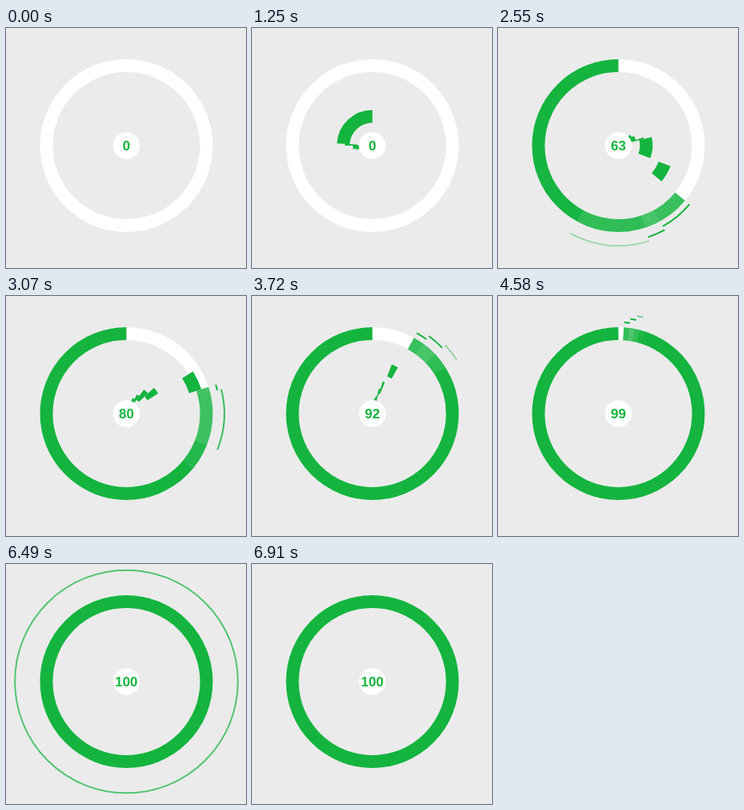
These frames come from a looping animation (300x300 px, 8000 ms). An HTML page with a canvas:

```html
<!DOCTYPE html>
<html lang="en">
<head>
<meta charset="utf-8">
<title>Chunked progress ring</title>
<style>
  html, body { margin: 0; width: 100%; height: 100%; overflow: hidden; background: #ebebeb; }
  canvas, svg { position: absolute; left: 0; top: 0; width: 300px; height: 300px; }
  text { font: bold 17px "Liberation Sans", Arial, sans-serif; fill: #14b43f; text-anchor: middle; }
</style>
</head>
<body>
<canvas id="stage"></canvas>
<svg viewBox="0 0 300 300">
  <circle cx="150.5" cy="147" r="16.8" fill="#fff"/>
  <text id="count" x="150.4" y="153">0</text>
</svg>
<script>
const LOOP = 8000, CX = 150.5, CY = 147, RING = 100, BAND = 16;
const GREEN = '#14b43f', WHITE = '#fff';

// Chunk i lands at FIRST + i * STEP; the stream lags midway and before its last chunk
const FIRST = 1480, STEP = 147, LAG = 150, LAST_WAIT = 1220;
const CLOSE = 5920, CLOSE_TIME = 990;

// Percent carried by each chunk
const sizes = [24, 1, 3, 1, 13, 13, 3, 6, 5, 10, 1, 4, 3, 3, 2, 2, 1, 1, 1, 1, 1, 1];
const LAST = sizes.length - 1;
let sum = 0;
const chunks = sizes.map(size => ({ size, from: sum, to: sum += size }));

const canvas = document.getElementById('stage');
const label = document.getElementById('count');
const ctx = canvas.getContext('2d');
const dpr = window.devicePixelRatio || 1;
canvas.width = canvas.height = 300 * dpr;
ctx.scale(dpr, dpr);

const clamp = x => Math.min(1, Math.max(0, x));
const smooth = x => x * x * (3 - 2 * x);
const easeOut = (x, power) => 1 - (1 - x) ** power;

// Steps since chunk i landed, negative while it is still on its way
function age(i, t) {
  const lag = LAG * clamp((t - 3000) / 700);
  const wait = i === LAST ? LAST_WAIT : 0;
  return (t - FIRST - lag - wait) / STEP - i;
}

// Emerge from the disc, drift outwards, then leap to the ring
function flight(v) {
  const emerge = 13 * clamp((v + 7) / 2.5);
  const leap = 48 * smooth(clamp(1 + v / 1.2));
  return Math.max(emerge, 52 + 10 * v) + leap;
}

// Arc between two percentages, counter-clockwise from the top
function arc(from, to, radius, width, color, alpha = 1) {
  const angle = p => -Math.PI / 2 - p / 50 * Math.PI;
  ctx.globalAlpha = alpha;
  ctx.strokeStyle = color;
  ctx.lineWidth = width;
  ctx.beginPath();
  ctx.arc(CX, CY, radius, angle(from), angle(to), true);
  if (to - from === 100) ctx.closePath();
  ctx.stroke();
}

function draw(t) {
  const ages = chunks.map((_, i) => age(i, t));
  const landed = ages.filter(v => v >= 0).length;
  let count = 0;

  ctx.globalAlpha = 1;
  ctx.fillStyle = '#ebebeb';
  ctx.fillRect(0, 0, 300, 300);
  arc(0, 100, RING, BAND, WHITE);
  if (landed) arc(0, chunks[landed - 1].to, RING, BAND, GREEN);

  chunks.forEach(({ size, from, to }, i) => {
    const v = ages[i];
    count += size * easeOut(clamp(v + 0.2), 3);

    if (v < 0) {
      arc(from, to, flight(v), BAND, GREEN);
      return;
    }
    const flash = 0.24 * clamp(1 - Math.abs(v - 1.1) / 2.3);
    if (flash) arc(from, to, RING, BAND, WHITE, flash);
    const fade = clamp((2.7 - v) / 1.2);
    if (fade && i < LAST) arc(from, to, 113.8 + 5 * v, 2, GREEN, fade);
  });

  // Closing ripple around the whole ring
  const u = (t - CLOSE) / CLOSE_TIME;
  if (u > 0 && u < 1) {
    arc(0, 100, 108 + 33 * easeOut(u, 3.5), 2, GREEN, clamp((1 - u) / 0.6));
  }

  const text = String(Math.round(count));
  if (label.textContent !== text) label.textContent = text;
}

function tick() {
  draw(performance.now() % LOOP);
  requestAnimationFrame(tick);
}
tick();
</script>
</body>
</html>
```
